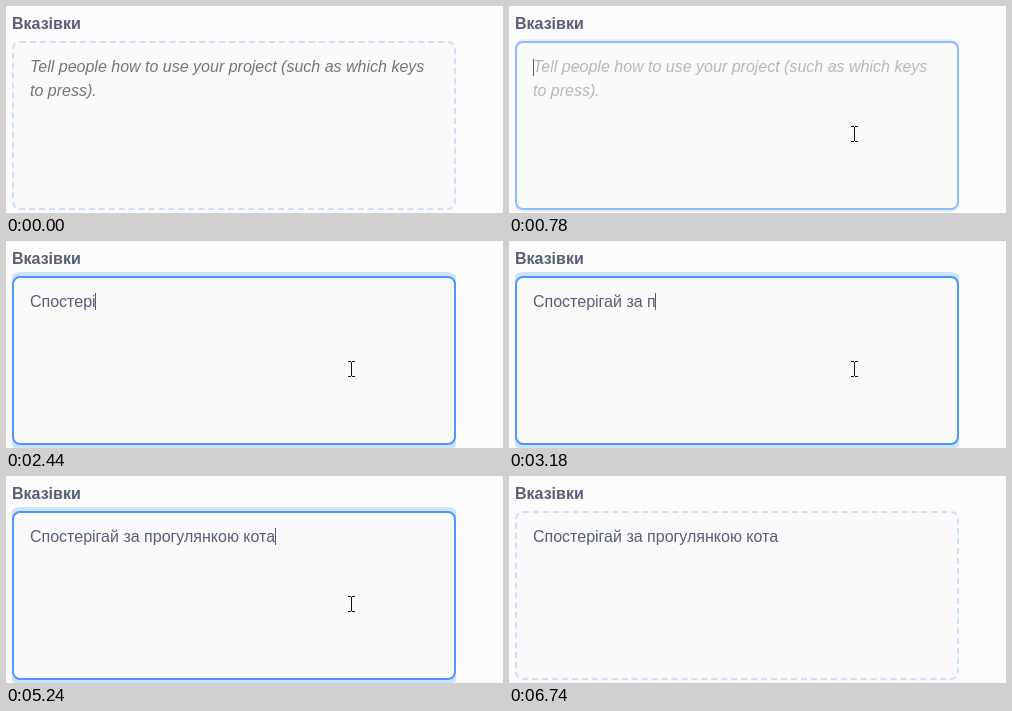
These frames come from a looping animation (497x207 px, 7.12 s). An HTML page:

```html
<!DOCTYPE html>
<html lang="uk">
<head>
<meta charset="utf-8">
<title>Вказівки</title>
<style>
  html, body { margin: 0; width: 100%; height: 100%; overflow: hidden; }
  body {
    position: relative;
    background: #fcfcfc;
    color: #575e75;
    font: 16px/17px "Liberation Sans", Arial, sans-serif;
  }
  body * { position: absolute; }
  h1 { left: 6px; top: 9px; margin: 0; font: inherit; font-weight: bold; }

  /* Cuts the focus ring off at the sides of the field. */
  #clip { left: 6px; top: 0; width: 444px; height: 207px; overflow: hidden; }
  #field {
    top: 35px; width: 444px; height: 169px;
    box-sizing: border-box;
    border: 2px dashed rgba(76, 151, 255, .25);
    border-radius: 8px;
    background: #fafafa;
  }
  #hint { left: 24px; top: 52px; color: #757575; font-style: italic; white-space: pre; }
  #hint span { left: 0; }
  #hint span + span { top: 24px; }
  #typed { left: 24px; top: 52px; white-space: pre; }
  #caret { width: 1px; height: 17px; background: #575e75; }
  svg { left: 0; top: 0; overflow: visible; opacity: 0; }
</style>
</head>
<body>
<h1>Вказівки</h1>
<div id="clip"><div id="field"></div></div>
<div id="hint"><span>Tell people how to use your project (such as which keys</span><span>to press).</span></div>
<div id="typed"></div>
<div id="caret"></div>
<svg id="beam" width="7" height="16" shape-rendering="crispEdges">
  <path d="M0 0h3v1h-3zM4 0h3v1h-3zM3 1h1v14h-1zM0 15h3v1h-3zM4 15h3v1h-3z" fill="#111"/>
</svg>
<svg id="arrow" width="12" height="19">
  <path d="M.5 .5V16.3L4.2 12.9L6.6 18.4L9 17.4L6.7 12H11.5Z" fill="#fff" stroke="#111"/>
</svg>
<script>
const LOOP = 7120;
const TEXT = 'Спостерігай за прогулянкою кота';
const $ = id => document.getElementById(id);
const [field, hint, typed, caret, beam, arrow] =
  ['field', 'hint', 'typed', 'caret', 'beam', 'arrow'].map($);

// n evenly spaced times from a to b
const spread = (a, b, n) => Array.from({ length: n }, (_, i) => a + (b - a) * i / (n - 1));

// Loops hard-cut poses given as [ms, styles].
function play(el, poses) {
  const frames = poses.map(([ms, style]) => ({ ...style, offset: ms / LOOP, easing: 'step-end' }));
  frames.push({ ...poses.at(-1)[1], offset: 1 });
  return el.animate(frames, { duration: LOOP, iterations: Infinity });
}

// Focus ring: p runs from 0 (idle) to 1 (focused)
const ring = p => ({
  borderStyle: p ? 'solid' : 'dashed',
  borderColor: `rgba(76, 151, 255, ${.25 + .75 * p})`,
  boxShadow: `0 0 0 ${4 * p}px rgba(76, 151, 255, ${.25 * p})`
});
const focusIn = [[0, 0], [750, .22], [780, .5], [830, .8], [880, .95], [940, 1]];
const focusOut = [[6340, .97], [6390, .34], [6430, .1], [6470, 0]];
const clock = play(field, [
  ...focusIn.map(([ms, p]) => [ms, ring(p)]),
  ...focusOut.map(([ms, p]) => [ms, { ...ring(p), borderStyle: 'dashed' }])
]);
play(hint, focusIn.map(([ms, p]) => [ms, { opacity: 1 - p }]));

// Pointer: hot-spot positions as [ms, x, y]
const easeOut = u => 1 - (1 - u) ** 2;
const easeInOut = u => u * u * (3 - 2 * u);
const glide = (t0, t1, n, [x0, y0], [x1, y1], ease) => spread(t0, t1, n).map((ms, i) => {
  const k = ease(t0 < 1000 ? i / (n - 1) : (i + 1) / n);
  return [ms, Math.round(x0 + (x1 - x0) * k), Math.round(y0 + (y1 - y0) * k)];
});
const track = [
  ...glide(170, 420, 7, [433, 194], [345, 129], easeOut),
  [580, 345, 128],
  ...glide(5650, 6210, 14, [345, 128], [458, 137], easeInOut),
  [6630, 458, 144], [6670, 456, 161], [6700, 454, 183]
];
const hidden = { opacity: 0, transform: 'none' };
const at = (x, y) => ({ opacity: 1, transform: `translate(${x}px, ${y}px)` });
const inside = x => x < 450;
play(beam, [[0, hidden], ...track.map(([ms, x, y]) =>
  [ms, inside(x) ? at(x - 3, y - 8) : hidden]).filter(([ms, s]) => ms < 6630 || s === hidden)]
  .filter(([ms]) => ms < 6630));
play(arrow, [[0, hidden], ...track.map(([ms, x, y]) =>
  [ms, inside(x) || ms < 5650 ? hidden : at(x, y)]), [6740, hidden]]);

// Typing and caret blink
const keys = [
  1650, 1730, 1870,
  ...spread(2010, 2610, 8), ...spread(2770, 3180, 6), ...spread(3320, 3350, 2),
  ...spread(3510, 3810, 4), ...spread(3980, 4690, 8)
];
const caretOn = [[750, 1240], [1650, 5240], [5770, 6250]];

function draw() {
  const t = (clock.currentTime || 0) % LOOP;
  const n = keys.filter(ms => ms <= t).length;
  const shown = TEXT.slice(0, n);
  if (typed.textContent !== shown) typed.textContent = shown;
  caret.style.left = 24 + Math.floor(typed.getBoundingClientRect().width) + 'px';
  caret.style.top = (n ? 52 : 53) + 'px';
  caret.style.opacity = caretOn.some(([a, b]) => t >= a && t < b) ? 1 : 0;
  requestAnimationFrame(draw);
}
draw();
</script>
</body>
</html>
```
